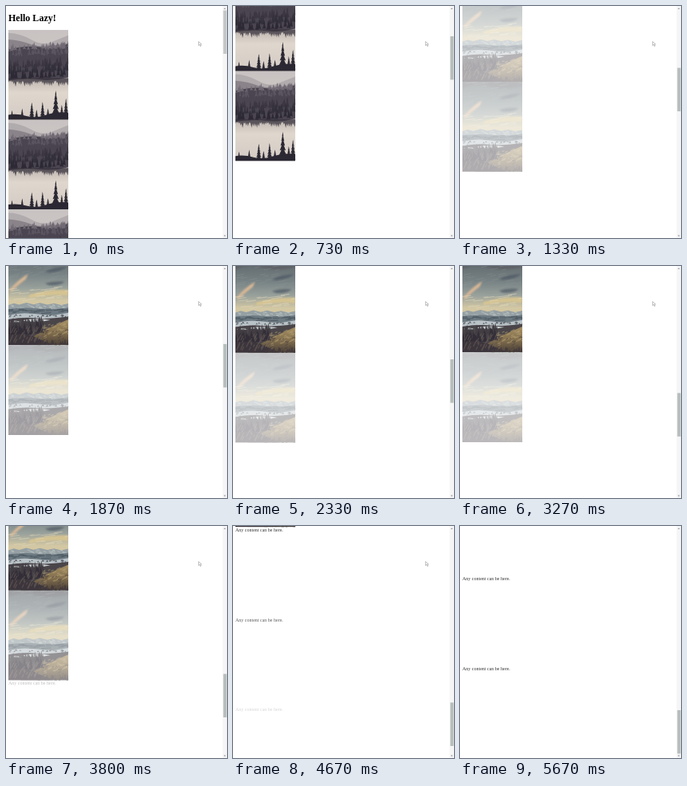
An HTML page for the animation above (6790 ms loop, 277 by 291 pixels).

```html
<!DOCTYPE html>
<html lang="en">
<head>
<meta charset="utf-8">
<title>Hello Lazy!</title>
<style>
html, body { margin: 0; width: 100%; height: 100%; overflow: hidden; background: #fff; }
svg { display: block; }
text { font-family: "Liberation Serif", "Times New Roman", serif; }
</style>
</head>
<body>
<svg id="stage" width="277" height="291" viewBox="0 0 277 291">
  <defs>
    <linearGradient id="mist" x2="0" y2="1">
      <stop offset="0" stop-color="#c8c2c2"/><stop offset="1" stop-color="#d8d1c9"/>
    </linearGradient>
    <linearGradient id="lake" x2="0" y2="1">
      <stop offset="0" stop-color="#bdb5af"/><stop offset=".35" stop-color="#dfd7cd"/><stop offset="1" stop-color="#d3cbc4"/>
    </linearGradient>
    <linearGradient id="dusk" x2="0" y2="1">
      <stop offset="0" stop-color="#626a6e"/><stop offset=".35" stop-color="#788385"/>
      <stop offset=".6" stop-color="#9aa29c"/><stop offset=".82" stop-color="#d3c8a4"/><stop offset="1" stop-color="#d6c59c"/>
    </linearGradient>
    <linearGradient id="grass" x2="0" y2="1">
      <stop offset="0" stop-color="#a48e62"/><stop offset=".5" stop-color="#83704e"/><stop offset="1" stop-color="#4b4038"/>
    </linearGradient>
    <filter id="soft" x="-30%" y="-60%" width="160%" height="220%"><feGaussianBlur stdDeviation="3"/></filter>
    <symbol id="forest" viewBox="0 0 200 300"></symbol>
    <symbol id="valley" viewBox="0 0 200 300"></symbol>
  </defs>
  <rect width="277" height="291" fill="#fff"/>
  <g id="page"><text x="8" y="50" font-size="32" font-weight="bold">Hello Lazy!</text></g>
  <rect x="271.5" width="5.5" height="291" fill="#f5f5f5"/>
  <path d="M272.8 4l1.4-1.8 1.4 1.8zM272.8 287.6l1.4 1.8 1.4-1.8z" fill="#a0a0a0"/>
  <rect id="thumb" x="272.4" width="4.1" height="54.5"/>
  <path id="cursor" transform="translate(241.4 44.6) scale(.31)" d="M0 0V16l4-4 3 7 3-1-3-7h5z" fill="#fff" stroke="#8c8c8c" stroke-width="1.8"/>
</svg>
<script>
const LOOP = 6790, FRAME = 200 / 3;
const SCALE = 0.3757, TOP = 80, ITEM = 300, MAX = 3213;
const FADE = 600;
const $ = id => document.getElementById(id);

let seed = 7;
const rnd = (a, b) => {
  seed = (seed * 16807) % 2147483647;
  return a + (b - a) * seed / 2147483647;
};

function add(parent, tag, attrs) {
  const el = document.createElementNS("http://www.w3.org/2000/svg", tag);
  for (const k in attrs) el.setAttribute(k, attrs[k]);
  parent.appendChild(el);
  return el;
}
const path = (parent, d, fill, more) => add(parent, "path", { d, fill, ...more });

// Conifer outline: tiers of widening branches
function fir(x, top, base, w, tiers) {
  let left = "", right = "";
  for (let i = 1; i <= tiers; i++) {
    const y = top + (base - top) * i / tiers, r = w * i / tiers;
    right += `L${x + r} ${y}L${x + r * 0.45} ${y - 2}`;
    left = `L${x - r * 0.45} ${y - 2}L${x - r} ${y}` + left;
  }
  return `M${x} ${top}${right}${left}Z`;
}

function wood(parent, n, x0, x1, ground, h, w, fill) {
  let d = "";
  for (let i = 0; i < n; i++) {
    const x = rnd(x0, x1), y = ground(x) + rnd(-4, 4);
    d += fir(x, y - rnd(h * 0.6, h), y, rnd(w * 0.6, w), 2);
  }
  path(parent, d, fill);
}

// Short slanted strokes scattered between two edges
function strokes(parent, n, x0, x1, upper, lower, len, rise, stroke, opacity) {
  let d = "";
  for (let i = 0; i < n; i++) {
    const x = rnd(x0, x1), y = rnd(upper(x), lower(x)), l = rnd(len * 0.4, len);
    d += `M${x} ${y}l${l} ${-l * rise}`;
  }
  path(parent, d, "none", { stroke, "stroke-width": 3, opacity });
}

function drawForest(g) {
  add(g, "rect", { width: 200, height: 300, fill: "url(#mist)" });
  path(g, "M0 10Q40 12 75 32T140 42L200 18V90H0Z", "#a9a3a6", { opacity: 0.75 });
  path(g, "M0 32Q40 34 75 48T200 44V100H0Z", "#817b82", { opacity: 0.8 });
  path(g, "M0 66Q60 50 110 58T200 46V158Q150 172 100 166T0 172Z", "#4a4550");
  const rows = ["#716a74", "#5b5561", "#4a4450", "#3b3642", "#34303b", "#2d2934"];
  rows.forEach((c, i) =>
    wood(g, 34, 0, 200, x => 70 + i * 19 - x * 0.05, 25 + i * 2, 7, c));
  path(g, "M0 168Q60 160 110 166T200 160V300H0Z", "url(#lake)");
  let d = "";
  for (let x = 0; x < 204; x += 6) d += fir(x, rnd(172, 190), 163, 6, 1);
  path(g, d, "#37323d", { opacity: 0.75 });
  path(g, "M0 283Q30 278 60 287T125 284T200 276V300H0Z", "#2b2833");
  const firs = [[12, 268, 6], [46, 262, 7], [78, 242, 10], [94, 266, 7], [114, 240, 10],
    [132, 262, 8], [158, 202, 15], [178, 250, 9], [192, 228, 11]];
  firs.forEach(([x, y, w]) => path(g, fir(x, y, 296, w, 6), "#2b2833"));
}

function drawValley(g) {
  const cloud = { filter: "url(#soft)" };
  add(g, "rect", { width: 200, height: 185, fill: "url(#dusk)" });
  path(g, "M0 0H200V14Q140 30 90 16T0 22Z", "#5b5c62", { ...cloud, opacity: 0.7 });
  strokes(g, 40, -10, 200, () => 4, () => 110, 36, 0.2, "#8e9695", 0.3);
  path(g, "M4 116Q30 84 66 62L58 80Q34 98 8 122Z", "#d8b795", cloud);
  path(g, "M120 56Q150 40 196 38Q180 54 136 58Z", "#56606a", cloud);
  path(g, "M122 94Q150 84 188 88Q170 104 134 100Z", "#606a72", cloud);
  path(g, "M70 132Q140 112 200 116V134Q130 130 70 142Z", "#dfc98f", { ...cloud, opacity: 0.8 });
  strokes(g, 24, -10, 190, () => 108, () => 154, 34, 0.12, "#e6dcbc", 0.45);

  path(g, "M0 166L18 160L36 165L60 158L84 164L106 159L130 165L152 160L176 166L200 161V220H0Z", "#95a0a4");
  strokes(g, 34, 0, 200, () => 164, () => 176, 12, -0.3, "#c3c8c6", 0.6);
  path(g, "M0 180Q50 172 100 178T200 174V220H0Z", "#6d7a82");
  strokes(g, 30, -10, 200, () => 180, () => 194, 26, 0.05, "#48535c", 0.7);
  path(g, "M0 200Q40 190 82 195T150 200L200 192V214Q150 220 104 212T0 214Z", "#b9c2c7");
  wood(g, 22, 0, 200, () => 205, 9, 6, "#565c61");
  path(g, "M0 214Q50 206 88 210T200 205V300H0Z", "#4a4549");
  path(g, "M44 218q40-10 96-2q-44 12-96 2zM4 222q20-8 36 0q-20 6-36 0z", "#c5cccf");

  const hill = x => 262 - x * 0.22;
  path(g, "M200 214Q158 232 128 246T40 300H200Z", "url(#grass)");
  strokes(g, 46, 100, 200, hill, x => hill(x) + 44, 14, 0.5, "#b8a377", 0.55);
  strokes(g, 36, 90, 200, x => hill(x) + 10, () => 300, 12, 0.6, "#4c4140", 0.6);
  wood(g, 34, 0, 128, x => 246 - x * 0.1, 34, 7, "#413d42");
  wood(g, 30, 0, 112, x => 274 - x * 0.15, 46, 8, "#322d37");
  path(g, "M0 264Q60 258 96 276T150 300H0Z", "#3c353c");
  strokes(g, 40, 0, 120, x => 250 - x * 0.1, () => 296, 10, 2, "#75685e", 0.5);
  wood(g, 14, 100, 200, () => 302, 20, 8, "#433a3c");
}

drawForest($("forest"));
drawValley($("valley"));

// Moment at which each block begins to fade in
const starts = [-FADE, -FADE, -FADE, 1090, 1090, 1590, 2120, 2590, 3060, 3450, 3620, 4190, 4550];
const items = starts.map((start, i) => {
  const y = TOP + i * ITEM;
  let el;
  if (i < 10) {
    el = add($("page"), "use", { href: i < 3 ? "#forest" : "#valley", x: 8, y, width: 200, height: 300 });
  } else {
    el = add($("page"), "text", { x: 8, y: y + 15, "font-size": 16, fill: "#333" });
    el.textContent = "Any content can be here.";
  }
  return { el, start };
});

const scrollKeys = [[267, 0], [533, 400], [667, 400], [933, 800], [1000, 800], [1333, 1027],
  [1867, 1316], [2800, 1865], [3800, 2565], [4667, 3077], [5130, MAX]];

const clamp = v => Math.max(0, Math.min(1, v));

function scrollAt(t) {
  let i = 0;
  while (i < scrollKeys.length - 2 && t > scrollKeys[i + 1][0]) i++;
  const [t0, s0] = scrollKeys[i], [t1, s1] = scrollKeys[i + 1];
  const p = clamp((t - t0) / (t1 - t0));
  const eased = t < 1000 ? p * p * (3 - 2 * p) : p;
  return s0 + (s1 - s0) * eased;
}

function draw(ms) {
  const t = Math.floor((ms + 4) / FRAME) * FRAME;
  const s = scrollAt(t);
  $("page").setAttribute("transform", `scale(${SCALE}) translate(0 ${-s})`);
  items.forEach(({ el, start }) => el.setAttribute("opacity", clamp((t - start) / FADE)));
  $("thumb").setAttribute("y", 5.5 + 225.5 * s / MAX);
  $("thumb").setAttribute("fill", s ? "#b6bdbb" : "#c3c6c6");
  $("cursor").setAttribute("visibility", t < 5660 ? "visible" : "hidden");
}

const origin = performance.now();
function tick() {
  draw((performance.now() - origin) % LOOP);
  requestAnimationFrame(tick);
}
tick();
</script>
</body>
</html>
```
